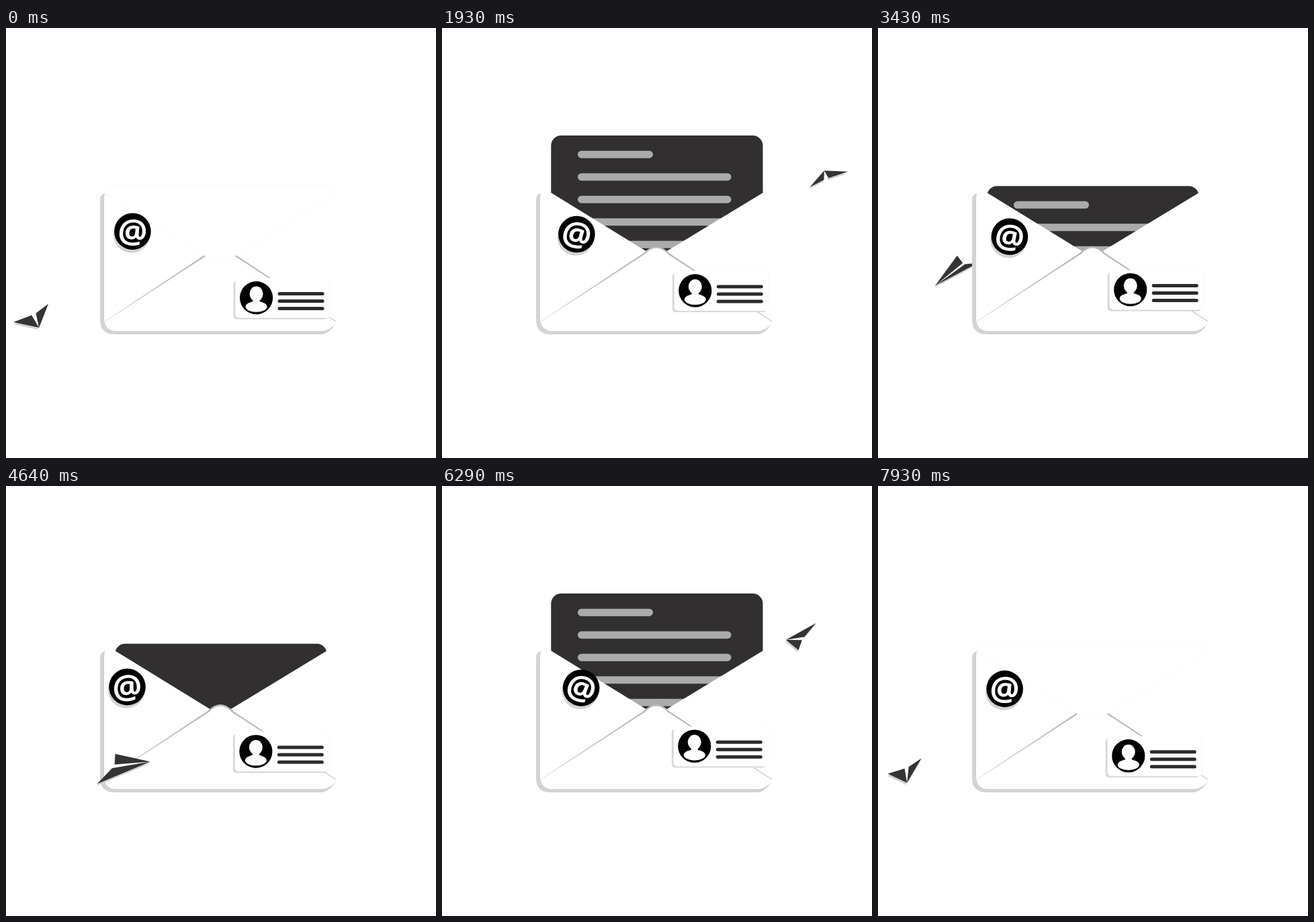
Write an HTML page with a canvas that moves like this. It is 640x640 px and loops after 8000 ms.

```html
<!DOCTYPE html>
<html lang="en">
<head>
<meta charset="utf-8">
<title>Mail</title>
<style>
html, body { margin: 0; width: 100%; height: 100%; overflow: hidden; background: #fff; }
canvas { display: block; width: 100vmin; height: 100vmin; }
</style>
</head>
<body>
<canvas id="stage" width="640" height="640"></canvas>
<script>
const ctx = document.getElementById('stage').getContext('2d');
const LOOP = 8000, HALF = 4000, RAD = Math.PI / 180;
const DARK = '#312f30', GREY = '#d3d3d3', BAR = '#ababab';

const clamp = v => Math.max(0, Math.min(1, v));
const smooth = v => { v = clamp(v); return v * v * (3 - 2 * v); };

// Mean plus harmonics of angle a (degrees), each an [amplitude, phase] pair
const wave = (a, mean, ...parts) => parts.reduce(
  (sum, [amp, phase], i) => sum + amp * Math.cos(((i + 1) * a - phase) * RAD), mean);

function fill(d, color) {
  ctx.fillStyle = color;
  ctx.fill(new Path2D(d));
}

function poly(color, ...pts) {
  ctx.fillStyle = color;
  ctx.beginPath();
  pts.forEach(p => ctx.lineTo(p[0], p[1]));
  ctx.closePath();
  ctx.fill();
}

function oval(x, y, rx, ry, color) {
  ctx.fillStyle = color;
  ctx.beginPath();
  ctx.ellipse(x, y, rx, ry, 0, 0, Math.PI * 2);
  ctx.fill();
}

function box(x, y, w, h, r, color) {
  ctx.fillStyle = color;
  ctx.beginPath();
  ctx.roundRect(x, y, w, h, r);
  ctx.fill();
}

// The plane circles the envelope on a tilted orbit, facing along its path
function drawPlane(t) {
  const a = t / HALF * 360;
  const nose = [wave(a, 306, [271, 166], [0, 0], [6, 0]), wave(a, 329.4, [117, 5], [11, 90])];
  const ahead = [wave(a, 0, [63, 79], [8, 90]), wave(a, 6, [34, -62])];
  const across = [wave(a, 0, [55, -19], [16, 90]), wave(a, 0, [45, -127])];
  const at = (back, side) => nose.map((n, i) => n - back * ahead[i] + side * across[i]);
  const foldL = at(0.85, 0.11), foldR = at(0.86, -0.01);
  const wings = color => {
    poly(color, nose, at(1, 0.5), foldL);
    poly(color, nose, foldR, at(1, -0.5));
  };
  ctx.save();
  ctx.translate(-1, 3);
  wings(GREY);
  ctx.restore();
  poly('#fff', nose, foldL, foldR);
  wings('#353334');
}

function drawLetter(t) {
  const settle = from => Math.exp(-0.0102 * Math.max(0, t - from));
  const drop = 75.5 * (t < 2900 ? settle(640) : 1 - settle(2900));
  const top = 160 + drop;
  box(162.3, top, 315.2, 345 - top, [15, 15, 0, 0], DARK);
  if (t > 3920) return;
  for (let i = 0; i < 5; i++) {
    const p = clamp((t - 685 - i * 180) / 180);
    const len = i ? 228.5 : 112;
    if (p > 0) box(202, 182.7 + i * 33.5 + drop, Math.max(11, len * p), 11, 5.5, BAR);
  }
}

function drawBack() {
  fill('M148 246Q140 247 140 256V434Q140 456 162 456H468Q482 456 492 437L300 300Z', GREY);
  fill('M148 246Q146 248 146 256V432Q147 451 166 451H470Q483 450 492 437V246Z', '#fff');
}

function drawPocket() {
  fill('M148 246L162 245L319 341.5L478 245L492 246V437Q483 450 470 451H166Q149 451 147 436V250Z', '#fff');
  fill('M148 436L300 335Q319 315 338 335L492 437Z', '#b9b9b9');
  fill('M147 437L302 336.5Q319 318.5 336 336.5L492 438Q483 450 470 451H166Q149 451 147 437Z', '#fff');
}

function drawFlap(t) {
  const s = t < 2000 ? 1 - smooth((t - 140) / 330) : smooth((t - 3480) / 380);
  if (s < 0.01) return;
  ctx.save();
  ctx.translate(0, 240);
  ctx.scale(1, s);
  ctx.translate(0, -240);
  const d = 'M148 246Q152 233 168 233H472Q488 233 492 246L342 338.5Q319 354 296 338.5Z';
  fill(d, '#fff');
  ctx.strokeStyle = '#fafafa';
  ctx.lineWidth = 1;
  ctx.stroke(new Path2D(d));
  ctx.restore();
}

function drawBadge(a) {
  const x = wave(a, 195, [6, 20], [7, 230], [8, 165]);
  const y = wave(a, 304, [6, 100], [0, 0], [3, 95]);
  oval(x - 1.5, y + 4.5, 27.3, 27.3, GREY);
  oval(x, y, 27.3, 27.3, '#000');
  ctx.save();
  ctx.translate(x, y + 1);
  ctx.rotate((x - 185) * 0.8 * RAD);
  ctx.font = '700 49px "Open Sans", "Noto Sans", sans-serif';
  ctx.fillStyle = '#fff';
  const m = ctx.measureText('@');
  ctx.fillText('@', (m.actualBoundingBoxLeft - m.actualBoundingBoxRight) / 2,
    (m.actualBoundingBoxAscent - m.actualBoundingBoxDescent) / 2);
  ctx.restore();
}

function drawCard(a) {
  ctx.save();
  ctx.translate(wave(a, 374.5, [1, 110], [2.5, 230]),
    wave(a, 393, [3, 0], [4, 20], [2.5, -42]));
  box(-34, -26, 140, 58, 5, '#d8d8d8');
  box(-31, -29.5, 141, 59.5, 5, '#f9f9f9');
  box(-31, -29, 140, 58.5, 5, '#fff');
  oval(0, 0, 24.6, 24.6, '#000');
  oval(0, -6, 10, 11, '#fff');
  box(-5, 0, 10, 10, 2, '#fff');
  oval(0, 13.2, 16, 8, '#fff');
  for (const dy of [-6, 5, 16]) box(32, dy - 2.5, 69, 5, 2.5, '#2c2a2b');
  ctx.restore();
}

function draw(now) {
  const t = now % LOOP, h = t % HALF, a = t / LOOP * 360;
  const front = h < 2000;
  ctx.fillStyle = '#fff';
  ctx.fillRect(0, 0, 640, 640);
  if (!front) drawPlane(h);
  drawBack();
  drawLetter(h);
  drawPocket();
  drawFlap(h);
  drawBadge(a);
  drawCard(a);
  if (front) drawPlane(h);
}

const start = performance.now();
function tick() {
  draw(performance.now() - start);
  requestAnimationFrame(tick);
}
tick();
</script>
</body>
</html>
```
